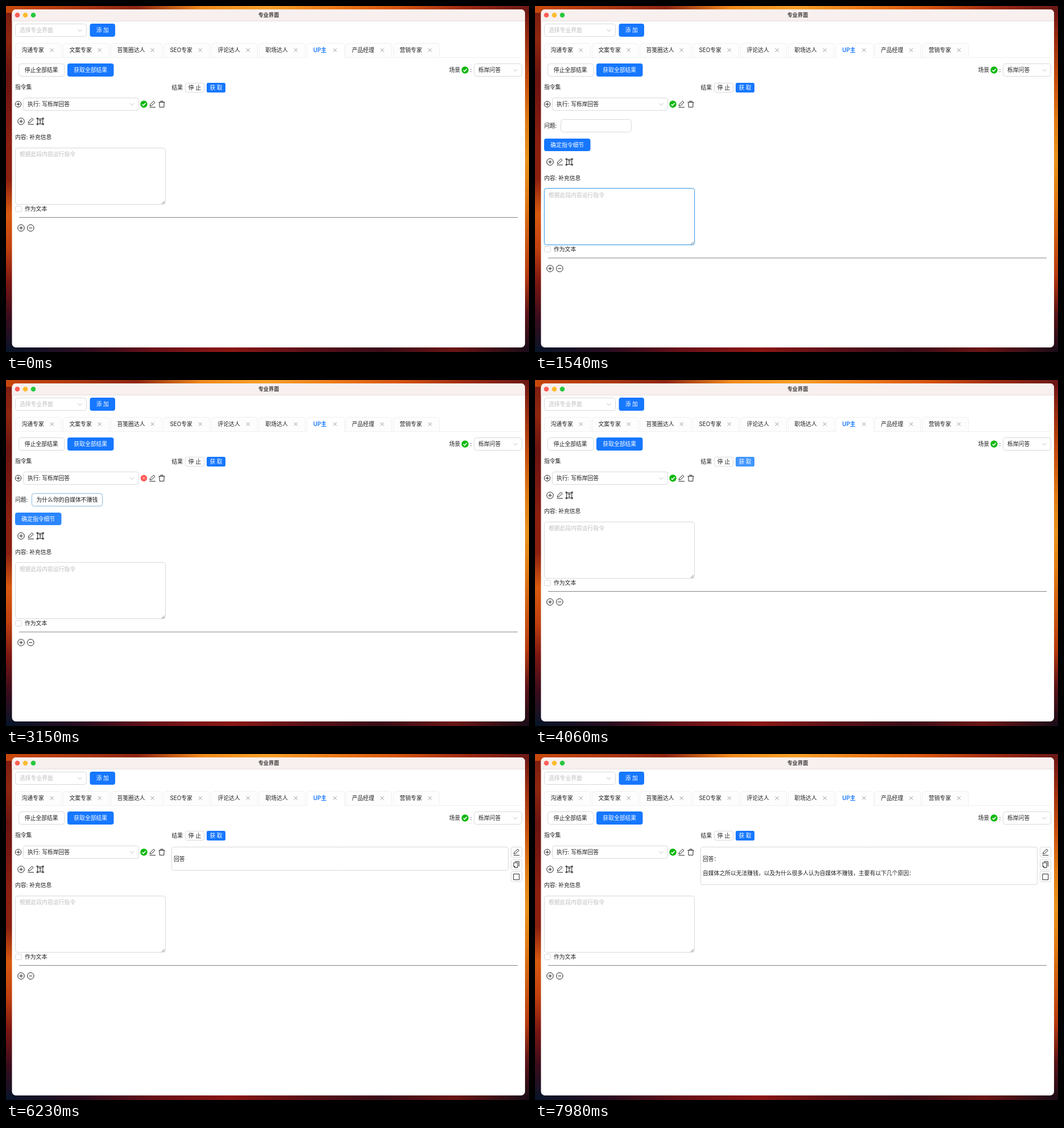
An HTML page with a canvas for the animation above (8000 ms loop, 920x608 px).

```html
<!DOCTYPE html>
<html lang="zh-CN">
<head>
<meta charset="utf-8">
<title>专业界面</title>
<style>
html, body { margin: 0; width: 100%; height: 100%; overflow: hidden; }
canvas { display: block; }
</style>
</head>
<body>
<canvas id="stage" width="920" height="608"></canvas>
<script>
const ctx = document.getElementById('stage').getContext('2d');
const LOOP = 8000, FORM_HEIGHT = 71.3;
const INK = '#1f1f1f', GREY = '#bfbfbf', WHITE = '#ffffff', LINE = [217, 217, 217];
const BLUE = [22, 119, 255], HOVER = [64, 150, 255], FOCUS = [74, 160, 228];
const GREEN = [16, 184, 16], RED = [255, 90, 88];
const ANSWER = '自媒体之所以无法赚钱，以及为什么很多人认为自媒体不赚钱，主要有以下几个原因：';
const TABS = [
  ['沟通专家', 16, 82], ['文案专家', 100, 82], ['苔笺圈达人', 184, 91],
  ['SEO专家', 277, 82], ['评论达人', 361, 82], ['职场达人', 445, 82],
  ['UP主', 529, 67], ['产品经理', 597, 82], ['营销专家', 681, 82]
];
const ICONS = {
  close: 'M-3-3L3 3M3-3L-3 3',
  chevron: 'M-3.6-1.8L0 2L3.6-1.8',
  plus: 'M-3 0H3M0-3V3',
  minus: 'M-3 0H3',
  check: 'M-3 .2L-.8 2.4L3.2-2',
  cross: 'M-1.7-1.7L1.7 1.7M1.7-1.7L-1.7 1.7',
  edit: 'M-5 5.5H5.5M-4.3 3L-3.8.5L2.2-5.3L4.6-3L-1.6 2.7Z',
  trash: 'M-5.5-3.3H5.5M-2-3.3V-5.3H2V-3.3M-4.2-3.3L-3.8 5.3H3.8L4.2-3.3',
  letter: 'M-4.5-4.5H4.5V4.5H-4.5ZM-2.2-1.6V-2.4H2.2V-1.6M0-2.4V2.6M-1 2.6H1' +
    'M-6-6h2v2h-2zM4-6h2v2h-2zM-6 4h2v2h-2zM4 4h2v2h-2z',
  copy: 'M-4.7-3.2H2.2V5.5H-2.5L-4.7 3.3ZM-4.7 3.3H-2.5V5.5M-2.7-5.3H4.6V3.6',
  square: 'M-5-5H5V5H-5Z',
  grip: 'M-2.5 2.5L2.5-2.5M.3 2.5L2.5.3'
};

const progress = (t, start, length) => Math.min(1, Math.max(0, (t - start) / length));
const pulse = (t, on, rise, off, fall) => progress(t, on, rise) - progress(t, off, fall);
const mix = (a, b, k) => `rgb(${a.map((v, i) => Math.round(v + (b[i] - v) * k))})`;

function text(str, x, y, color = INK, { weight = 400, align = 'left', size = 9.8 } = {}) {
  ctx.font = `${weight} ${size}px Inter, "Noto Sans CJK SC", "Noto Sans CJK", sans-serif`;
  ctx.textAlign = align;
  ctx.fillStyle = color;
  ctx.fillText(str, x, y + size * 0.37);
}

function box(x, y, w, h, { r = 4, fill = WHITE, stroke = mix(LINE, LINE, 0) } = {}) {
  ctx.beginPath();
  if (stroke) ctx.roundRect(Math.round(x) + .5, Math.round(y) + .5, w - 1, h - 1, r);
  else ctx.roundRect(x, y, w, h, r);
  ctx.fillStyle = fill;
  ctx.fill();
  if (!stroke) return;
  ctx.strokeStyle = stroke;
  ctx.lineWidth = 1;
  ctx.stroke();
}

function icon(name, x, y, color = INK, width = 1) {
  ctx.save();
  ctx.translate(x, y);
  ctx.strokeStyle = color;
  ctx.lineWidth = width;
  ctx.stroke(new Path2D(ICONS[name]));
  ctx.restore();
}

function disc(x, y, r, color) {
  ctx.beginPath();
  ctx.arc(x, y, r, 0, Math.PI * 2);
  ctx.fillStyle = color;
  ctx.fill();
}

function ringIcon(name, x, y, r = 5.8) {
  ctx.beginPath();
  ctx.arc(x, y, r, 0, Math.PI * 2);
  ctx.strokeStyle = INK;
  ctx.lineWidth = 1;
  ctx.stroke();
  icon(name, x, y);
}

function checkMark(x, y) {
  disc(x, y, 6.2, mix(GREEN, GREEN, 0));
  icon('check', x, y, WHITE, 1.6);
}

function select(x, y, w, label, color) {
  box(x, y, w, 23);
  text(label, x + 8, y + 11.5, color);
  icon('chevron', x + w - 12, y + 11.7, GREY);
}

function button(label, x, y, w, h, fill, r = 4) {
  box(x, y, w, h, fill ? { fill, r, stroke: null } : { r });
  text(label, x + w / 2, y + h / 2, fill ? WHITE : INK, { weight: fill ? 500 : 400, align: 'center' });
}

function field(x, y, w, h, focus) {
  if (focus > 0) box(x - 1.2, y - 1.2, w + 2.4, h + 2.4, { r: 5, fill: `rgba(5,145,255,${.12 * focus})`, stroke: null });
  box(x, y, w, h, { stroke: mix(LINE, FOCUS, focus) });
}

function caret(x, y) {
  ctx.fillStyle = INK;
  ctx.fillRect(x, y, 1, 12);
}

function strip(x, y, w, h, colors) {
  const g = ctx.createLinearGradient(0, 0, w > h ? w : 0, w > h ? 0 : h);
  colors.split(' ').forEach((c, i, all) => g.addColorStop(i / (all.length - 1), '#' + c));
  ctx.fillStyle = g;
  ctx.fillRect(x, y, w, h);
}

function drawWindow() {
  strip(0, 0, 460, 608, '7a1c12 8e2610 6a1410 7a1812 8c2010 8a2010 d85a10 c0400f 7a1612 3a0c1c 081428');
  strip(460, 0, 460, 608, '6a1216 a03010 c85010 e07a14 e8921c e07a14 cc5a10 b83a10 5a1418 1a0c18');
  strip(0, 600, 920, 8, '081428 2a0c20 6a1018 8a1614 5c1018 3a0c18 6a1414 1a0c18');
  strip(0, 0, 920, 12, 'c8480c b23a10 8d2412 f08a1c f6a02a ec7a18 d6540f a02a12 6a1816');
  box(10.5, 6, 902.5, 594, { r: 7, stroke: null });
  ctx.beginPath();
  ctx.roundRect(10.5, 6, 902.5, 20, [7, 7, 0, 0]);
  ctx.fillStyle = '#f7f0ef';
  ctx.fill();
  ctx.fillStyle = '#e6dfde';
  ctx.fillRect(10.5, 26, 902.5, 1);
  ['#ff5f57', '#febc2e', '#28c840'].forEach((c, i) => disc(20 + i * 14, 16, 4.3, c));
  text('专业界面', 462, 16, '#403c3c', { weight: 600, align: 'center', size: 9.2 });
}

function drawHeader() {
  const blue = mix(BLUE, BLUE, 0);
  select(16, 31, 126, '选择专业界面', GREY);
  button('添 加', 147.5, 31, 44.5, 23, blue);

  ctx.fillStyle = '#f0f0f0';
  ctx.fillRect(16, 90, 891, 1);
  for (const [label, x, w] of TABS) {
    const active = label === 'UP主';
    ctx.beginPath();
    ctx.roundRect(x + .5, 65.5, w - 1, 25, [5, 5, 0, 0]);
    ctx.fillStyle = active ? WHITE : '#fdfdfd';
    ctx.fill();
    ctx.strokeStyle = '#f0f0f0';
    ctx.lineWidth = 1;
    ctx.stroke();
    if (active) {
      ctx.fillStyle = WHITE;
      ctx.fillRect(x + 1, 89, w - 2, 3);
    }
    text(label, x + 11.5, 77.5, active ? blue : INK, { weight: active ? 600 : 400 });
    icon('close', x + w - 17.3, 77.5, '#8c8c8c', .9);
  }

  button('停止全部结果', 21.5, 101, 81.5, 23);
  button('获取全部结果', 108, 101, 81.5, 23, blue);
  text('场景', 779.5, 112.5);
  checkMark(807.5, 112.5);
  text(':', 816.5, 112.5);
  select(823, 101, 85, '栎岸问答', INK);
}

function drawCommand(t, failed) {
  text('指令集', 16, 142.5);
  ringIcon('plus', 21.5, 172.5, 5.2);
  select(30, 161, 204, '执行: 写栎岸回答', INK);
  if (failed) {
    disc(242.5, 172.5, 5.7, mix(GREEN, RED, progress(t, 2200, 300)));
    icon('cross', 242.5, 172.5, WHITE, .9);
  } else checkMark(242.5, 172.5);
  icon('edit', 257.5, 172.5);
  icon('trash', 274, 172.5);
}

function drawForm(t) {
  text('问题:', 16, 210.5);
  field(45, 199, 125, 23, pulse(t, 1930, 170, 3050, 200));
  if (t >= 3080) text('为什么你的自媒体不赚钱', 53.5, 210.5);
  else if (t >= 2240) text('多人认为自媒体不赚钱?', 53.5, 210.5);
  if (t >= 1960 && t < 3080) caret(t < 2240 ? 53 : 160.5, 204.5);
  button('确定指令细节', 16, 233, 81.5, 22, mix(BLUE, HOVER, pulse(t, 2720, 150, 3050, 200)));
}

function drawContent(t, dy) {
  ringIcon('plus', 26.5, 202.7 + dy);
  icon('edit', 43.5, 202.5 + dy);
  icon('letter', 60.2, 202.7 + dy);
  text('内容: 补充信息', 16, 230.7 + dy);
  field(16, 249 + dy, 265, 100, pulse(t, 50, 300, 1540, 160));
  text('根据此段内容运行指令', 24, 260.7 + dy, GREY);
  if (t >= 140 && t < 630 || t >= 1120 && t < 1540) caret(24, 255);
  icon('grip', 276.5, 345.3 + dy, '#777');
  box(16, 351 + dy, 12, 11, { r: 2.5 });
  text('作为文本', 33, 356.5 + dy);
  ctx.fillStyle = '#858585';
  ctx.fillRect(23, 371 + dy, 877, 1);
  ringIcon('plus', 26.5, 390 + dy);
  ringIcon('minus', 43.3, 390 + dy);
}

// Number of answer characters that have streamed in, in three bursts.
function typedCount(t) {
  const step = (start, count) => Math.max(0, Math.min(count, Math.floor((t - start) / 70) + 1)) / count;
  if (t < 6370) return 0;
  return Math.round(1 + 6 * step(6510, 2) + 15 * step(6720, 9) + 16 * step(7700, 5));
}

function drawResult(t) {
  text('结果', 291.5, 143);
  button('停 止', 315, 135, 34, 17, null, 2.8);
  const wave = progress(t, 4060, 630);
  if (wave > 0 && wave < 1) {
    const spread = 3 * (1 - (1 - wave) ** 3);
    box(353 - spread, 135 - spread, 33 + 2 * spread, 17 + 2 * spread,
      { r: 2.8 + spread, fill: `rgba(22,119,255,${.25 * (1 - wave)})`, stroke: null });
  }
  button('获 取', 353, 135, 33, 17, mix(BLUE, HOVER, pulse(t, 3620, 210, 4400, 250)), 2.8);

  if (t < 6230) return;
  const count = typedCount(t);
  box(291, 163, 593, count ? 67 : 42, { r: 3 });
  text(t < 6300 ? '回答' : '回答：', 295, 184);
  text(ANSWER.slice(0, count), 295, 209);
  ['edit', 'copy', 'square'].forEach((name, i) => {
    box(888, 163 + i * 21.6, 20, 19, { r: 2.8 });
    icon(name, 897.8, 172.5 + i * 21.7);
  });
}

function draw(t) {
  const formOpen = t >= 1540 && t < 3220;
  drawWindow();
  drawHeader();
  drawCommand(t, formOpen && t >= 2240);
  if (formOpen) drawForm(t);
  drawContent(t, formOpen ? FORM_HEIGHT : 0);
  drawResult(t);
}

function tick() {
  draw(performance.now() % LOOP);
  requestAnimationFrame(tick);
}
tick();
</script>
</body>
</html>
```
